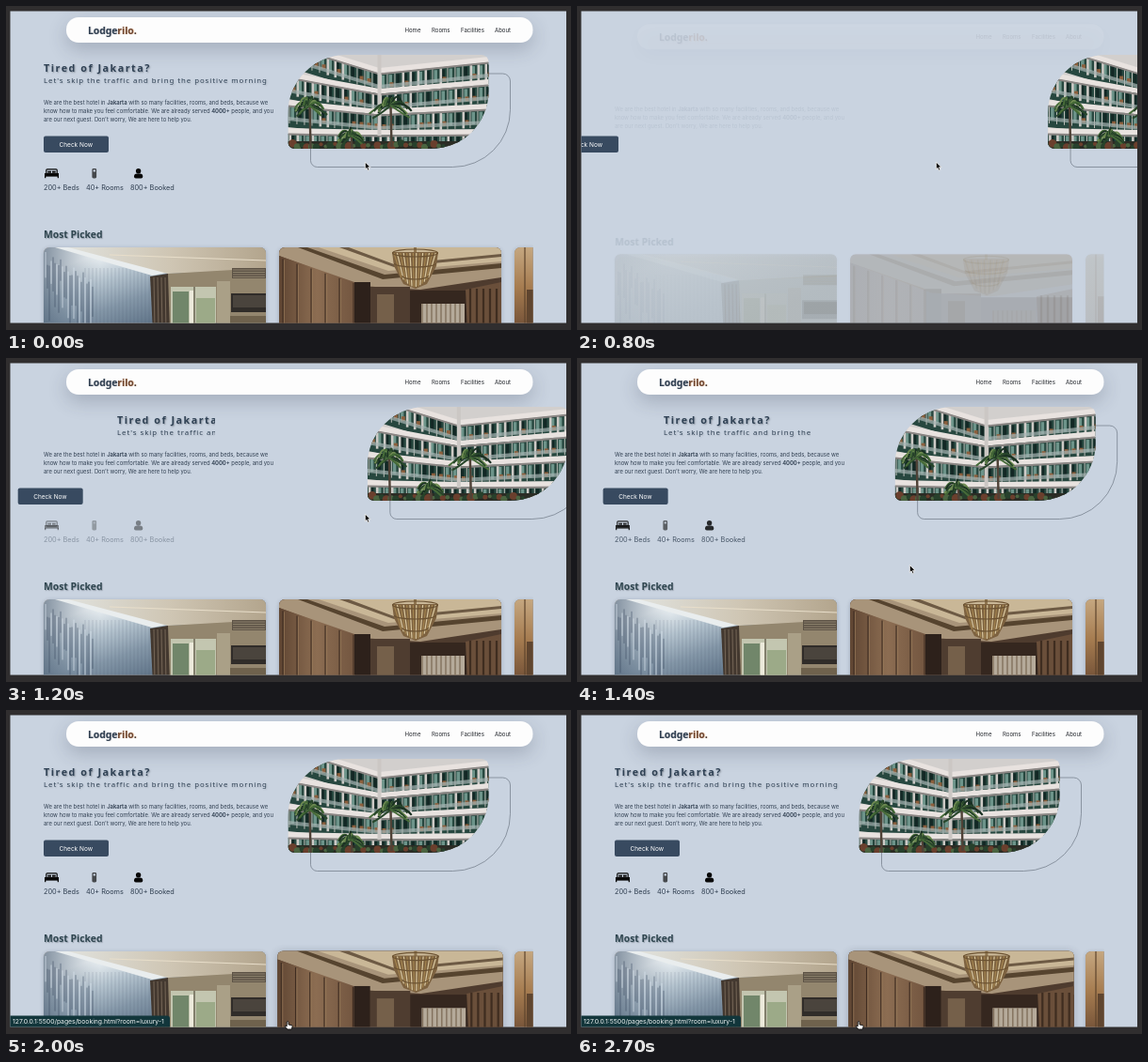
Write an HTML page with a canvas that moves like this. It is 600 px wide and 345 px high and loops after 2800 ms.

```html
<!DOCTYPE html>
<html lang="en">
<head>
<meta charset="utf-8">
<title>Hotel landing page</title>
<style>
  html, body { margin: 0; width: 100%; height: 100%; overflow: hidden; background: #302e2f; }
  canvas { display: block; width: 600px; height: 345px; }
</style>
</head>
<body>
<canvas id="stage" width="600" height="345"></canvas>
<script>
const ctx = document.getElementById('stage').getContext('2d');
const LOOP = 2800, STEP = 100, RELOAD = 700;
const UI = 'Inter, sans-serif', HEAD = '"Noto Sans", sans-serif';
const INK = '#2f3e50';

const clamp = v => Math.max(0, Math.min(1, v));
const mix = (a, b, p) => a + (b - a) * p;
const span = (t, start, length) => clamp((t - start) / length);

function bezier(x1, y1, x2, y2) {
  const at = (a, b, s) => 3 * (1 - s) ** 2 * s * a + 3 * (1 - s) * s * s * b + s ** 3;
  return x => {
    let lo = 0, hi = 1;
    for (let i = 0; i < 24; i++) {
      const mid = (lo + hi) / 2;
      if (at(x1, x2, mid) < x) lo = mid; else hi = mid;
    }
    return x <= 0 ? 0 : x >= 1 ? 1 : at(y1, y2, lo);
  };
}
const ease = bezier(.25, .1, .25, 1);
const slide = bezier(.24, .28, .6, 1);

function seeded(seed) {
  return () => (seed = (seed * 16807) % 2147483647) / 2147483647;
}

function layer(draw) {
  ctx.save();
  draw();
  ctx.restore();
}
function rect(color, x, y, w, h) {
  ctx.fillStyle = color;
  ctx.fillRect(x, y, w, h);
}
function round(x, y, w, h, r) {
  ctx.beginPath();
  ctx.roundRect(x, y, w, h, r);
}
function poly(color, ...pts) {
  ctx.beginPath();
  for (let i = 0; i < pts.length; i += 2) ctx.lineTo(pts[i], pts[i + 1]);
  ctx.closePath();
  ctx.fillStyle = color;
  ctx.fill();
}
function line(color, width, x1, y1, x2, y2) {
  ctx.strokeStyle = color;
  ctx.lineWidth = width;
  ctx.beginPath();
  ctx.moveTo(x1, y1);
  ctx.lineTo(x2, y2);
  ctx.stroke();
}
function gradient(x1, y1, x2, y2, ...colors) {
  const g = ctx.createLinearGradient(x1, y1, x2, y2);
  colors.forEach((c, i) => g.addColorStop(i / (colors.length - 1), c));
  return g;
}
function shadow(color, x, y, blur) {
  ctx.shadowColor = color;
  ctx.shadowOffsetX = x;
  ctx.shadowOffsetY = y;
  ctx.shadowBlur = blur;
}
function text(str, x, y, font, color = INK, spacing = 0) {
  ctx.font = font;
  ctx.letterSpacing = spacing + 'px';
  ctx.fillStyle = color;
  ctx.fillText(str, x, y);
  return x + ctx.measureText(str).width;
}
// Words between asterisks are bold.
function richText(str, x, y, size) {
  str.split('*').forEach((part, i) => {
    x = text(part, x, y, `${i % 2 ? 600 : 400} ${size}px ${UI}`);
  });
}

function drawNav() {
  layer(() => {
    shadow('rgba(40,50,70,.24)', 0, 7, 20);
    round(64, 12, 495.5, 27, 13);
    ctx.fillStyle = '#fdfdfd';
    ctx.fill();
  });
  layer(() => {
    shadow('rgba(120,120,130,.5)', .7, .8, 1);
    const font = `bold 10.3px ${HEAD}`;
    let x = text('Lodge', 87, 29.5, font);
    shadow('rgba(210,140,80,.6)', .7, .8, 1);
    x = text('rilo', x, 29.5, font, '#6b4532');
    text('.', x, 29.5, font, '#3a2e2c');
  });
  [['Home', 423.5], ['Rooms', 452], ['Facilities', 483], ['About', 519]]
    .forEach(([label, x]) => text(label, x, 28.2, `6.05px ${UI}`, '#20242a'));
}

function drawParagraph() {
  [
    'We are the best hotel in *Jakarta* with so many facilities, rooms, and beds, because we',
    'know how to make you feel comfortable. We are already served *4000+* people, and you',
    "are our next guest. Don't worry, We are here to help you."
  ].forEach((row, i) => richText(row, 40, 105.2 + i * 8.7, 5.88));
}

function drawHeading(p) {
  const half = 130 * p, left = 170 - half;
  layer(() => {
    ctx.beginPath();
    ctx.rect(left, 55, half * 2, 34);
    ctx.clip();
    shadow('rgba(90,95,105,.5)', 1, 1, 1.5);
    text('Tired of Jakarta?', left, 69.8, `bold 10.7px ${HEAD}`, '#2f4154', 1.55);
    shadow('rgba(90,95,105,.22)', 1, 1, 1.5);
    text("Let's skip the traffic and bring the positive morning", left, 81.8, `7.8px ${HEAD}`, '#2f4154', .96);
  });
}

function drawButton(dx) {
  round(40 + dx, 138.5, 69, 17.5, 2);
  ctx.fillStyle = '#384a60';
  ctx.fill();
  text('Check Now', 56.5 + dx, 149.8, `6.5px ${UI}`, '#fff');
}

function drawStats() {
  // bed
  rect('#080808', 41, 178, 15, 3.6);
  rect('#080808', 41, 181, 1.3, 2.2);
  rect('#080808', 54.7, 181, 1.3, 2.2);
  ctx.lineWidth = 1.2;
  ctx.strokeStyle = '#080808';
  round(42.8, 173.8, 11.4, 5, 1);
  ctx.stroke();
  rect('#080808', 44.3, 175.7, 3.7, 2);
  rect('#080808', 49, 175.7, 3.7, 2);
  // door tag
  round(91.4, 173, 4.7, 10.4, 1.4);
  ctx.fillStyle = '#45484c';
  ctx.fill();
  ctx.beginPath();
  ctx.arc(93.8, 175.4, 1.2, 0, 7);
  ctx.fillStyle = '#c9d3e0';
  ctx.fill();
  // guest
  ctx.fillStyle = '#080808';
  ctx.beginPath();
  ctx.arc(140.6, 175.8, 2.7, 0, 7);
  ctx.fill();
  round(136, 178.6, 9.3, 4.8, [3.5, 3.5, 2, 2]);
  ctx.fill();
  [['200+ Beds', 40], ['40+ Rooms', 85], ['800+ Booked', 132]]
    .forEach(([label, x]) => text(label, x, 195.6, `7.3px ${UI}`));
}

function palm(x, y, size, base, seed) {
  const rnd = seeded(seed), greens = ['#27452a', '#466b38', '#1a3022', '#6d8a50'];
  line('#4f4237', 2.4, x, y, x + 1, base);
  ctx.lineWidth = 2;
  for (let i = 0; i < 22; i++) {
    const a = Math.PI * (.9 + 1.2 * i / 21) + (rnd() - .5) * .3;
    const r = size * (.55 + rnd() * .5), ex = x + Math.cos(a) * r;
    ctx.strokeStyle = greens[i % 4];
    ctx.beginPath();
    ctx.moveTo(x, y);
    ctx.quadraticCurveTo(mix(x, ex, .6), y + Math.sin(a) * r, ex, y + Math.sin(a) * r * .5 + size * .4);
    ctx.stroke();
  }
}

function drawFacade() {
  const W = 213, FOLD = 97;
  const floors = [[-16, 14, 2], [18, 36, 26], [48, 58, 52], [78, 80, 79]];
  const height = (floor, x) => x < FOLD ? mix(floor[0], floor[1], x / FOLD)
    : mix(floor[1], floor[2], (x - FOLD) / (W - FOLD));
  const band = (color, floor, from, to) => poly(color,
    0, floor[0] + from, FOLD, floor[1] + from, W, floor[2] + from,
    W, floor[2] + to, FOLD, floor[1] + to, 0, floor[0] + to);
  const rnd = seeded(71);
  rect('#d2cfcd', 0, 0, W, 100);
  floors.forEach(floor => {
    band('#27473f', floor, 6, 29);
    for (let x = 1; x < W; x += 8) {
      const y = height(floor, x) + 7;
      rect(rnd() > .55 ? '#6d948a' : '#132825', x + 2, y + 1, 3.5, 13);
      rect('#cdcac6', x, y, rnd() > .6 ? 2.6 : .9, 18);
      if (rnd() > .6) rect('#8c5f3d', x + 3, y + 9, 4, 5);
    }
    band('rgba(165,180,178,.7)', floor, 18, 22);
  });
  floors.forEach(floor => {
    band('#e8e2df', floor, 0, 5.5);
    band('#8b8684', floor, 5.5, 7.5);
  });
  rect('#cbc7c4', FOLD - 2, 0, 4, 86);
  rect('#2b2c25', 0, 92, W, 8);
  for (let i = 0; i < 34; i++) {
    ctx.fillStyle = ['#27402c', '#6a3f2d', '#4b6441'][i % 3];
    ctx.beginPath();
    ctx.arc(i * 5, 94 + rnd() * 5, 2 + rnd() * 3, 0, 7);
    ctx.fill();
  }
  palm(23, 54, 20, 100, 11);
  palm(67, 86, 17, 100, 23);
  palm(109, 54, 22, 98, 37);
}

function drawHero(dx) {
  layer(() => {
    ctx.translate(299.5 + dx, 52);
    const corners = [62, 8, 61, 7];
    round(24, 20, 212, 99.5, corners);
    ctx.strokeStyle = '#6d7784';
    ctx.lineWidth = .7;
    ctx.stroke();
    round(0, 0, 213, 100, corners);
    ctx.clip();
    drawFacade();
  });
}

function drawLobby() {
  const rnd = seeded(9);
  rect(gradient(55, 8, 85, 90, '#f0f4f6', '#b5c4cf', '#8497a8', '#63778b'), 0, 0, 236, 90);
  rect(gradient(0, 0, 60, 0, 'rgba(70,90,112,.65)', 'rgba(110,130,150,0)'), 0, 0, 60, 90);
  for (let x = 44; x < 114; x += 4) line('rgba(70,90,112,.22)', .8, x, 22, x, 90);
  poly('#e9edee', 12, 0, 30, 0, 132, 27, 115, 30);
  poly(gradient(30, 0, 236, 0, '#dfe0db', '#cfc6b4', '#b3a58d'), 26, 0, 236, 0, 236, 24, 132, 28);
  poly('#93866e', 132, 28, 236, 22, 236, 90, 132, 90);
  line('#e8deca', 1.2, 70, 8, 236, 14);
  for (let i = 0; i < 26; i++) {
    const x = 2 + i * 2, top = 5 + i * .9 + rnd() * 16;
    line(i % 3 ? 'rgba(50,68,88,.75)' : '#dce6ef', .7, x, top, x, top + 20 + rnd() * 40);
  }
  poly('#43382f', 113, 31, 132, 28, 134, 90, 116, 90);
  for (let x = 117; x < 132; x += 4) line('#756657', 1, x, 32, x + 1, 90);
  rect('#c3c6b0', 135, 42, 48, 48);
  rect('#71866a', 137, 47, 17, 35);
  rect('#eceadb', 155, 46, 4, 36);
  rect('#9caa88', 162, 54, 20, 28);
  line('#575040', 1.2, 160, 42, 160, 90);
  rect('#aaa087', 184, 36, 14, 54);
  rect('#302c29', 199, 49, 37, 20);
  rect('#4a443d', 201, 51, 35, 13);
  rect('#6f624d', 198, 73, 38, 17);
  // air vent
  rect('#5d5346', 200, 22, 36, 11);
  for (let y = 24; y < 33; y += 2.5) line('#a3977f', .7, 201, y, 235, y);
}

function drawSuite() {
  rect('#4e3b2e', 0, 0, 236, 90);
  poly('#a8947a', 0, 0, 236, 0, 236, 32, 150, 45, 86, 41, 0, 9);
  poly('#56442f', 20, 0, 30, 0, 112, 29, 236, 17, 236, 22, 110, 34);
  poly('#c9b797', 42, 0, 236, 0, 236, 15, 116, 25);
  poly('#6d5a44', 64, 0, 74, 0, 122, 18, 236, 7, 236, 10, 122, 21);
  poly(gradient(0, 0, 80, 0, '#604633', '#8c6d52', '#735640'), 0, 9, 80, 37, 80, 90, 0, 90);
  for (let x = 4; x < 80; x += 15) {
    line('#3e2c21', 1.1, x, 11 + x * .34, x, 90);
    line('#a0815f', .6, x + 1.5, 12 + x * .34, x + 1.5, 90);
  }
  rect('#2d211b', 80, 37, 17, 53);
  rect('#4f3d30', 97, 42, 42, 48);
  rect('#75604a', 104, 50, 18, 40);
  rect('#35271f', 139, 46, 97, 44);
  rect('#b5aa9a', 151, 60, 46, 30);
  for (let x = 152; x < 197; x += 5) line('#82715d', 1.4, x, 60, x, 90);
  poly('#6a4f3a', 198, 45, 236, 37, 236, 90, 200, 90);
  for (let x = 203; x < 236; x += 7) line('#3f2d20', 2.2, x, 44, x, 90);
  // chandelier
  rect('#8e754f', 143, 0, 3, 6);
  poly('#7d6240', 120, 5, 169, 5, 167, 20, 157, 39, 145, 44, 132, 39, 122, 20);
  for (let i = 0; i < 14; i++) {
    line(i % 2 ? '#dac9a0' : '#a3844f', 1.2, 122 + i * 3.4, 6, 130 + i * 2.2, 32 + 10 * Math.sin(i * Math.PI / 13));
  }
  ctx.strokeStyle = '#6b5232';
  ctx.lineWidth = 1.2;
  for (const [y, r] of [[6, 24], [17, 22], [30, 14]]) {
    ctx.beginPath();
    ctx.ellipse(144.5, y, r, 4, 0, 0, Math.PI * (y < 10 ? 2 : 1));
    ctx.stroke();
  }
}

function drawCorner() {
  rect(gradient(0, 0, 0, 85, '#c5a780', '#a67c50', '#745238'), 0, 0, 236, 90);
  line('#5d432c', 1.2, 11, 0, 11, 90);
  rect('#5f452f', 13, 45, 10, 45);
}

function card(x, paint, grow = 0) {
  layer(() => {
    ctx.translate(x + 118, 297);
    ctx.scale(1 + grow * .015, 1 + grow * .015);
    ctx.translate(-118, -40);
    layer(() => {
      shadow('rgba(50,60,80,.3)', 0, 1, 4 + grow * 4);
      round(0, 0, 236, 110, 6);
      ctx.fillStyle = '#8a7b6c';
      ctx.fill();
    });
    round(0, 0, 236, 110, 6);
    ctx.clip();
    paint();
  });
}

function drawRooms(hover) {
  layer(() => {
    shadow('rgba(90,100,110,.45)', .9, .9, 1);
    text('Most Picked', 40, 247.3, `bold 10.35px ${HEAD}`, '#2f4650');
  });
  layer(() => {
    ctx.beginPath();
    ctx.rect(30, 250, 529.5, 100);
    ctx.clip();
    card(40, drawLobby);
    card(290, drawSuite, hover);
    card(540, drawCorner);
  });
}

function drawStatus() {
  round(4, 325.5, 170, 13, [0, 3, 0, 0]);
  ctx.fillStyle = '#12363b';
  ctx.fill();
  text('127.0.0.1:5500/pages/booking.html?room=luxury-1', 7, 334, `6.8px ${UI}`, '#f2f6f6');
}

const ARROW = 'M0 0V8L1.8 6.4L3.1 9.2L4.6 8.5L3.3 5.8H5.8Z';
const HAND = 'M-1.8 -3Q-.9 -4.2 0 -3V0L3.4 .7Q4.3 1 4 2.4L3.2 5H-1.2L-3.9 1.7Q-3.3 .6 -1.8 1.8Z';

function drawCursor(t) {
  const a = span(t, 1250, 350), b = span(t, 1600, 300), pointing = a > .65;
  layer(() => {
    ctx.translate(mix(mix(381.3, 316, a), 300, b), mix(mix(166, 293, a), 335, b));
    const shape = new Path2D(pointing ? HAND : ARROW);
    ctx.lineJoin = 'round';
    ctx.lineWidth = .9;
    ctx.strokeStyle = pointing ? '#111' : '#f4f4f4';
    ctx.fillStyle = pointing ? '#fff' : '#000';
    ctx.fill(shape);
    ctx.stroke(shape);
  });
}

function render(t) {
  const loaded = t < RELOAD;
  const phase = (start, length, curve = x => x) => loaded ? 1 : curve(span(t, start, length));
  const fade = phase(760, 400, ease), enter = phase(752, 1020, slide);
  const typed = phase(800, 1000), stats = phase(1000, 480);
  const hover = loaded ? 0 : ease(span(t, 1600, 300));

  rect('#302e2f', 0, 0, 600, 345);
  layer(() => {
    ctx.beginPath();
    ctx.rect(4.5, 5.5, 590.5, 332);
    ctx.clip();
    rect('#c9d3e0', 0, 0, 600, 345);
    layer(() => {
      ctx.globalAlpha = fade;
      ctx.translate(0, 8 * (1 - fade));
      drawNav();
      drawParagraph();
      drawRooms(hover);
    });
    drawHeading(typed);
    drawButton(-69 * (1 - enter));
    layer(() => {
      ctx.globalAlpha = stats;
      drawStats();
    });
    drawHero(213 * (1 - enter));
    if (t >= 1800) drawStatus();
  });
  drawCursor(t);
}

function tick() {
  const t = performance.now() % LOOP;
  render(Math.floor(t / STEP) * STEP);
  requestAnimationFrame(tick);
}
tick();
</script>
</body>
</html>
```
